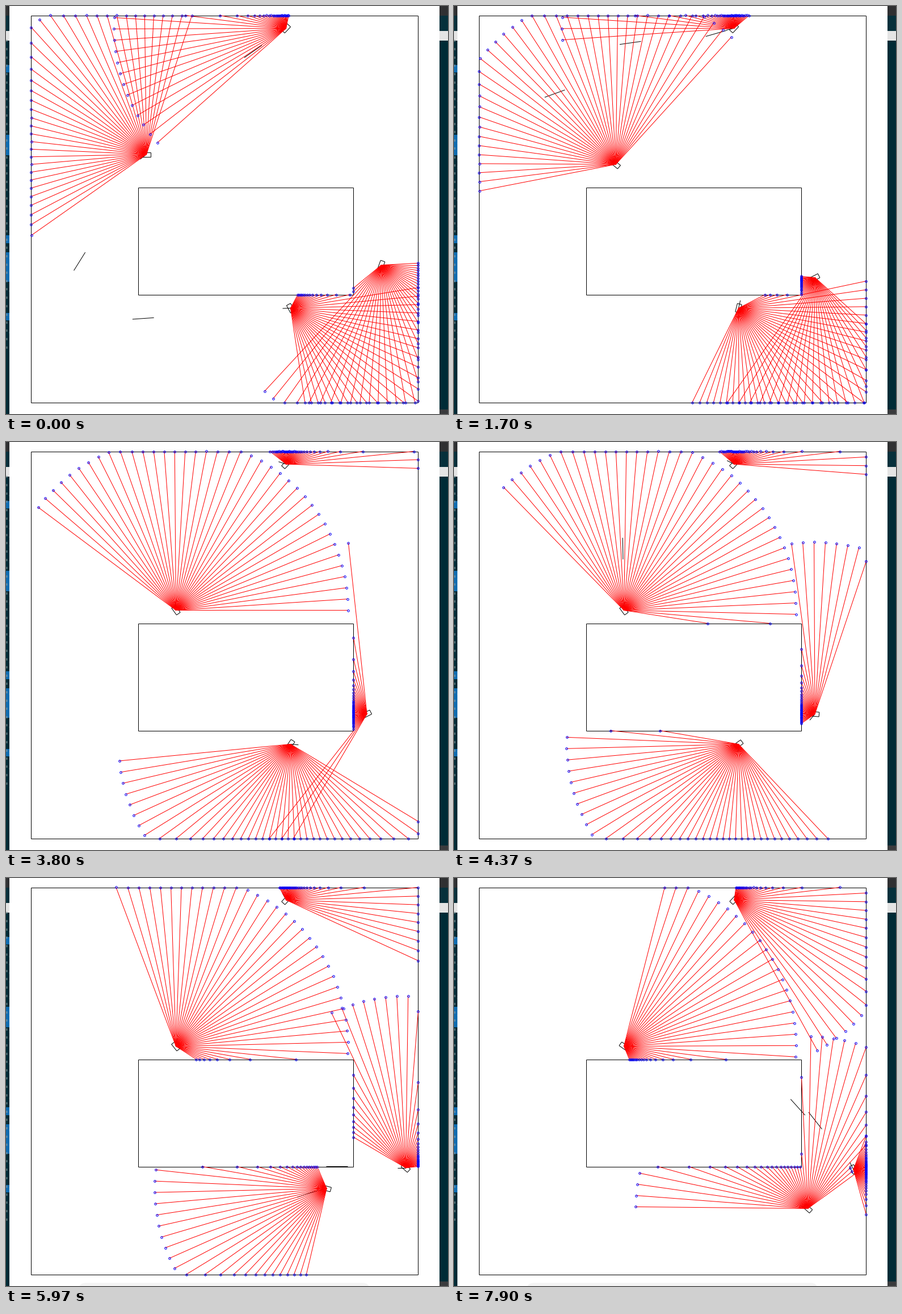
A matplotlib script for the animation above (7.99 s loop, 779 px wide and 719 px high).

```python
import random

import numpy as np
import matplotlib.pyplot as plt
from matplotlib.animation import FuncAnimation
from matplotlib.collections import LineCollection
from matplotlib.patches import FancyBboxPatch, Rectangle

W, H = 779, 719
FRAMES, INTERVAL = 170, 47
PX = 0.72                      # one pixel in points at 100 dpi
UNIT = 37.9                    # one arena unit in pixels
RANGE = 8 * UNIT
FAN = np.linspace(-1.25, 1.25, 39)
GUN, SHOT_LIFE = 14, 10
LEFT, TOP, RIGHT, BOTTOM = 44, 16, 726, 698

# The simulation advances in discrete steps that get shorter over time.
STEP_TIMES = np.concatenate([[0]] + [np.linspace(a, b, n) for a, b, n in (
    (60, 1100, 8), (1250, 2150, 7), (2300, 3200, 7), (3350, 4370, 8),
    (4510, 5510, 8), (5620, 6570, 9), (6680, 7720, 10), (7810, 7900, 2))])
HEADING_STEPS = np.array([0, 8, 17, 26, 35, 49, 59])


def track(step, keys):
    """Linear motion through (step, value, ...) key points."""
    steps, *values = zip(*keys)
    return np.array([np.interp(step, steps, v) for v in values])


def smooth(step, xs, ys):
    """Cubic Hermite curve through the key points."""
    slopes = np.gradient(ys, xs)
    i = min(np.searchsorted(xs, step, side="right"), len(xs) - 1) - 1
    width = xs[i + 1] - xs[i]
    u = (step - xs[i]) / width
    ease = u * u * (3 - 2 * u)
    bend = u * (1 - u) * ((1 - u) * slopes[i] - u * slopes[i + 1])
    return ys[i] + ease * (ys[i + 1] - ys[i]) + width * bend


def direction(radians):
    return np.stack([np.cos(radians), -np.sin(radians)], axis=-1)


def cross(a, b):
    return a[..., 0] * b[..., 1] - a[..., 1] * b[..., 0]


def edges(corners):
    corners = np.array(corners, float)
    return np.stack([corners, np.roll(corners, -1, axis=0)], axis=1)


def box(x0, y0, x1, y1):
    return edges([(x0, y0), (x1, y0), (x1, y1), (x0, y1)])


class Robot:
    def __init__(self, path, heading, chassis, gun, fires):
        self.path, self.heading = path, heading
        self.chassis, self.gun, self.fires = chassis, gun, fires

    def position(self, step):
        return track(step, self.path)

    def aim(self, step):
        return direction(np.radians(track(step, self.gun)[0]))

    def body(self, step):
        along = direction(np.radians(track(step, self.chassis)[0]))
        side = np.array([-along[1], along[0]])
        return edges([self.position(step) + 7.5 * i * along + 4 * j * side
                      for i, j in ((1, 1), (1, -1), (-1, -1), (-1, 1))])

    def barrel(self, step):
        origin = self.position(step)
        return np.array([origin, origin + GUN * self.aim(step)])

    def shots(self, step):
        for birth in self.fires:
            age = step - birth
            way = self.aim(birth)
            tip = self.position(birth) + (GUN + UNIT * age) * way
            x, y = tail = tip - UNIT * way
            inside = LEFT <= x <= RIGHT and TOP <= y <= BOTTOM
            if 1 <= age <= SHOT_LIFE and inside:
                yield np.array([tail, tip])

    def scan(self, step, segments):
        """End points of the sensor fan, stopped at the nearest segment."""
        origin = self.position(step)
        center = smooth(step, HEADING_STEPS, self.heading)
        rays = direction(np.radians(center) + FAN)[:, None]
        start = segments[None, :, 0] - origin
        span = (segments[:, 1] - segments[:, 0])[None]
        det = cross(rays, span)
        det = np.where(np.abs(det) < 1e-9, 1e-9, det)
        dist = cross(start, span) / det
        along = cross(start, rays) / det
        hit = (dist > 0) & (along >= 0) & (along <= 1)
        reach = np.where(hit, dist, RANGE).min(axis=1).clip(max=RANGE)
        return origin + reach[:, None] * rays[:, 0]


ROBOTS = (
    Robot(path=[(0, 247, 261), (8, 275, 267), (18, 299, 296)],
          heading=[143.5, 132.8, 99.8, 71.6, 53.2, 24.8, 4],
          chassis=[(0, 0), (17, -56), (49, -50), (59, -35)],
          gun=[(-6, 238), (0, 218), (14, 131), (27, 91), (59, 72)],
          fires=[-6, 14, 27, 30, 32]),
    Robot(path=[(0, 493, 39), (59, 493.4, 38)],
          heading=[150, 126.2, 94.8, 69.8, 65.1, 26.4, 10.5],
          chassis=[(0, 47)],
          gun=[(-2, 215), (7, 188), (11, 196), (15, 185), (35, 143), (59, 60)],
          fires=[-2, 3, 7, 11, 15]),
    Robot(path=[(34, 501, 532), (41, 562, 546), (49, 583, 551),
                (59, 623, 582)],
          heading=[-9.7, -25.8, -70.8, -102.8, -139.1, -211, -252.2],
          chassis=[(0, 118), (17, 59), (26, 56), (35, 11), (49, -42)],
          gun=[(-7, 184), (0, 182), (17, 33), (26, -5), (31, -115),
               (41, -162), (59, -200)],
          fires=[-7, 31, 33, 41]),
    Robot(path=[(0, 661, 456), (8, 636, 478), (30, 635.5, 479),
                (35, 640, 497.5), (40, 704, 510), (59, 703.5, 513)],
          heading=[-68.7, -96.5, -138.6, -192.2, -247, -314.5, -362.6],
          chassis=[(0, 70), (8, 27), (26, 27), (35, -45), (49, -38),
                   (59, -65)],
          gun=[(0, -100), (35, -135), (39, -180), (49, -180), (55, -228),
               (59, -243)],
          fires=[39, 42, 55, 56]),
)
WALLS = np.concatenate([box(LEFT, TOP, RIGHT, BOTTOM),
                        box(233, 319, 612, 508)])

fig = plt.figure(figsize=(W / 100, H / 100), dpi=100)
ax = fig.add_axes([0, 0, 1, 1])
ax.set_xlim(-0.5, W - 0.5)
ax.set_ylim(H - 0.5, -0.5)
ax.axis("off")


def fill(x0, y0, x1, y1, color, z=0):
    ax.add_patch(Rectangle((x0 - 0.5, y0 - 0.5), x1 - x0, y1 - y0,
                           fc=color, ec="none", zorder=z))


def draw_desktop():
    fill(0, 0, W, H, "#002b36")
    fill(0, 0, W, 17, "#2f3032")
    fill(0, 17, W, 44, "#06303b")
    fill(0, 44, W, 61, "#e4e4e4")
    fill(764, 711, W, H, "#3a3b3d")
    for y0, y1 in ((104, 117), (227, 263), (404, 418), (434, 486), (541, 554)):
        fill(0, y0, 7, y1, "#0f6cb0")
    rng = random.Random(4)
    for y in np.arange(65, 610, 14.6):
        ax.text(-3, y, "'" + rng.choice("aeornsl/="), color="#93a1a1",
                fontsize=8.5, family="Liberation Mono", va="center",
                zorder=0.5)
    fill(6, 0, 764, H, "white", 1)


def lines(color, z):
    return ax.add_collection(LineCollection(
        [], colors=color, linewidths=PX, capstyle="butt", zorder=z))


draw_desktop()
bar = ax.add_patch(FancyBboxPatch((140, 725), 488, 20, fc="#f4f4f4", ec="none",
                                  boxstyle="round,pad=12", zorder=1.5))
lines("black", 2).set_segments(WALLS)
black = lines("black", 3)
red = lines("red", 4)
dots, = ax.plot([], [], "o", ms=3.6 * PX, mfc="none", mec="blue", mew=PX,
                zorder=5)


def update(frame):
    now = (frame + 1) * INTERVAL
    step = np.searchsorted(STEP_TIMES, now, side="right") - 1
    bodies = [robot.body(step) for robot in ROBOTS]

    dark, rays, ends = [], [], []
    for robot, body in zip(ROBOTS, bodies):
        others = [b for b in bodies if b is not body]
        points = robot.scan(step, np.concatenate([WALLS] + others))
        origin = robot.position(step)
        rays += [(origin, p) for p in points]
        ends.append(points)
        dark += [*body, robot.barrel(step), *robot.shots(step)]

    black.set_segments(dark)
    red.set_segments(rays)
    dots.set_data(*np.concatenate(ends).T)
    bar.set_visible(bool(step >= 37))
    return black, red, dots, bar


anim = FuncAnimation(fig, update, frames=FRAMES, interval=INTERVAL,
                     repeat=True, repeat_delay=0, blit=False)
plt.show()
```
